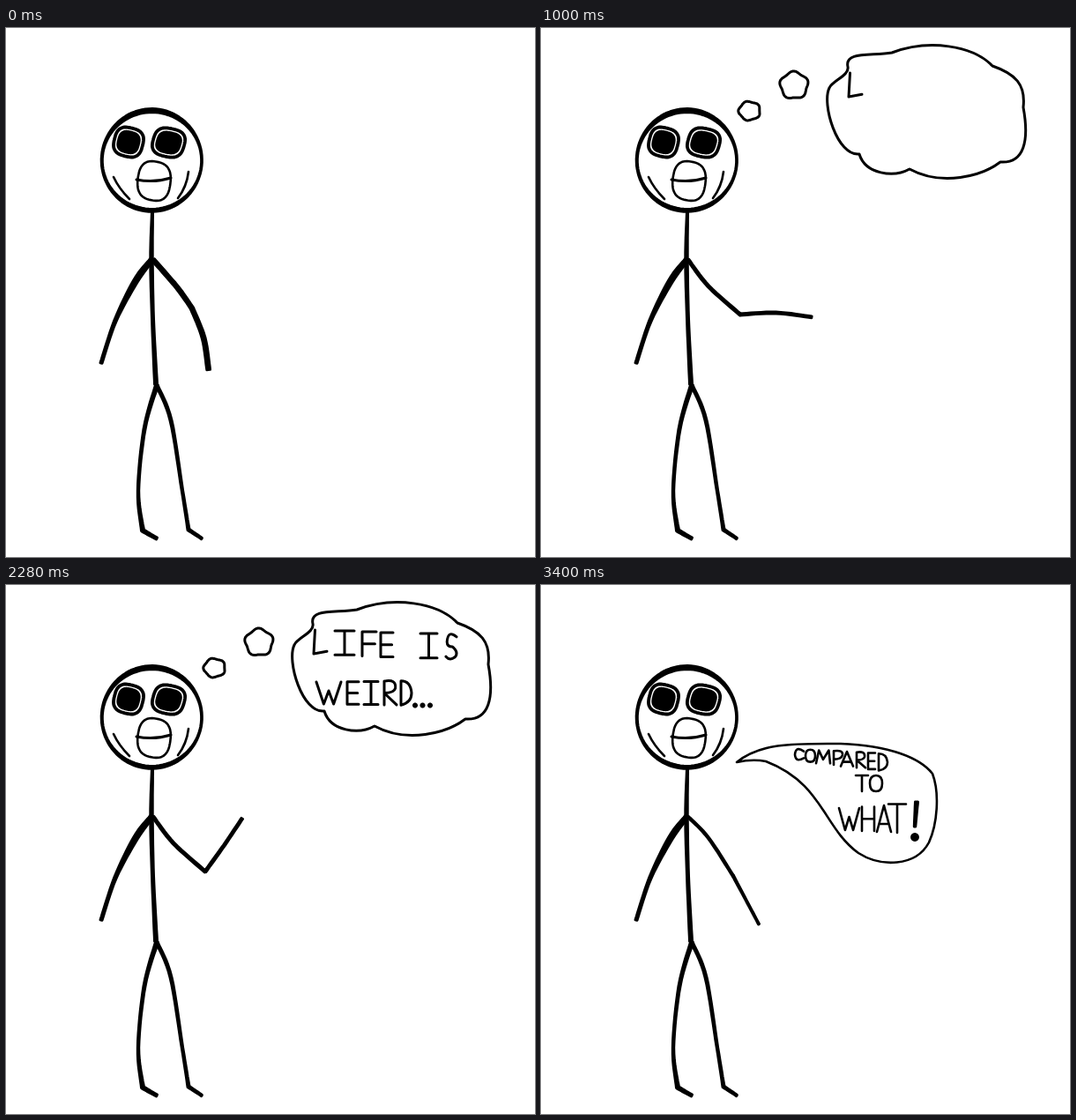
Recreate the animation shown at these times as an HTML page. Size 600 by 600 pixels, loop 3.84 s.

```html
<!DOCTYPE html>
<html lang="en">
<head>
<meta charset="utf-8">
<title>Life is weird</title>
<style>
html, body { margin: 0; width: 100%; height: 100%; overflow: hidden; background: #fff; }
svg { display: block; width: 100vw; height: 100vh; }
path { stroke: #000; stroke-width: 3; stroke-linecap: round; stroke-linejoin: round; fill-rule: evenodd; }
.pen { fill: none; }
.thin { fill: none; stroke-width: 2.6; }
.dot { stroke: none; }
</style>
</head>
<body>
<svg id="stage" viewBox="0 0 600 600" role="img" aria-label="Life is weird... Compared to what!"></svg>
<script>
const LOOP = 3840, STEP = 40, TAU = 2 * Math.PI;
const svg = document.getElementById('stage');

function add(cls, d = '') {
  const el = document.createElementNS('http://www.w3.org/2000/svg', 'path');
  el.setAttribute('class', cls);
  el.setAttribute('d', d);
  svg.appendChild(el);
  return el;
}

const mix = (p, q, u) => p.map((v, i) => v + (q[i] - v) * u);
const poly = pts => 'M' + pts.map(p => p[0].toFixed(1) + ' ' + p[1].toFixed(1)).join('L') + 'Z';
const around = (n, f) => Array.from({ length: n }, (_, i) => f(i / n * TAU));

// Catmull-Rom samples through [x, y, width] points
function smooth(pts) {
  const out = [], last = pts.length - 1;
  for (let i = 0; i < last; i++) {
    const a = pts[Math.max(0, i - 1)], b = pts[i], c = pts[i + 1], d = pts[Math.min(last, i + 2)];
    for (let u = 0; u < 1; u += 0.125) {
      out.push(b.map((v, j) => v + 0.5 * u * (c[j] - a[j] +
        u * (2 * a[j] - 5 * v + 4 * c[j] - d[j] + u * (3 * (v - c[j]) + d[j] - a[j])))));
    }
  }
  return [...out, pts[last]];
}

// Outline of a line of varying width; the 3 px round stroke finishes its ends
function brush(pts) {
  const c = smooth(pts), left = [], right = [];
  c.forEach((p, i) => {
    const a = c[Math.max(0, i - 1)], b = c[Math.min(c.length - 1, i + 1)];
    const dx = b[0] - a[0], dy = b[1] - a[1];
    const k = Math.max(0.2, (p[2] - 3) / 2) / (Math.hypot(dx, dy) || 1);
    left.push([p[0] - dy * k, p[1] + dx * k]);
    right.unshift([p[0] + dy * k, p[1] - dx * k]);
  });
  return poly(left.concat(right));
}
const limb = (...pts) => add('ink', brush(pts));

// Uneven ellipse with a number of soft lobes
const lump = (cx, cy, rx, ry, lobes, amp, turn = 0) => poly(around(72, a => {
  const r = 1 + amp * Math.cos(lobes * (a - turn));
  return [cx + rx * r * Math.cos(a), cy + ry * r * Math.sin(a)];
}));
const dot = (x, y, r) => lump(x, y, r, r, 0, 0);

// Head: a circle drawn thicker at top and bottom
const headEdge = side => poly(around(90, a => {
  const w = 5.2 - 1.3 * Math.cos(2 * a) - 0.6 * Math.sin(a + 0.3);
  const r = 56.6 + 2.2 * Math.cos(a - 0.9) + side * (w - 3) / 2;
  return [164 + r * Math.cos(a), 148.5 + r * Math.sin(a)];
}));
add('ink', headEdge(1) + headEdge(-1));

function eye(x, y, rx, ry) {
  add('pen', lump(x, y, rx, ry, 4, -0.05, 0.25)).style.strokeWidth = 3.8;
  add('dot', lump(x, y, rx - 3.4, ry - 3.4, 4, -0.05, 0.25));
}
eye(139, 129.5, 17.2, 17.2);
eye(184.5, 130, 18.8, 16.9);

add('thin', lump(168, 173.5, 19.3, 23, 4, -0.04, 0.15));
add('pen', 'M148 172Q168 176 187 170');
add('thin', 'M122 169Q128 182 140 194M207 163Q205 180 195 193');

// Body, left arm, legs
limb([166, 208, 4], [165, 262, 5.5], [166.5, 330, 5], [170, 404, 6]);
limb([165, 263, 7], [147, 287, 8], [124, 332, 5.5], [108, 380, 5]);
limb([171, 405, 6], [157, 455, 5], [150, 525, 4.5], [155, 570, 6]);
limb([155, 570, 6], [171, 579, 5]);
limb([171, 405, 5], [187, 445, 5], [200, 525, 4.5], [207, 569, 5]);
limb([207, 569, 5], [222, 579, 4.5]);

// Right arm pose: mid x, mid y, elbow x, elbow y, angle, length, bulge, upper width, fore width
const REST = [194, 294, 211, 318, 165, 72, -4, 6.5, 6.8];
const DOWN = [190, 287, 218, 330, 152, 62, 0, 4.4, 4];
const upper = add('ink'), fore = add('ink');

// u = 0: hand up by the face, u = 1: forearm level; the swing slows midway
function raised(u) {
  const ang = -10 + 102 * u * (2.08 + u * (3.4 * u - 4.48));
  return [190, 293, 226, 325, ang, 81 - 10 * Math.sin(Math.PI * u), 3 - ang * 0.07, 5, 4.8];
}

function armPose(t) {
  if (t < 160) return REST;
  if (t <= 600) return mix(REST, raised(1 / 7), (t - 120) / 480);
  if (t >= 2640) return DOWN;
  if (t > 2360) return mix(raised(1), DOWN, (t - 2360) / 280);
  const k = (t / STEP) % 17;
  return raised(Math.max(0, Math.min(k, 17 - k) - 1) / 7);
}

function drawArm([mx, my, ex, ey, ang, len, bulge, wu, wf]) {
  const a = ang * Math.PI / 180, s = Math.sin(a), c = Math.cos(a);
  const along = (u, side) => [ex + s * len * u + c * side, ey - c * len * u + s * side, wf];
  upper.setAttribute('d', brush([[167, 263, wu], [mx, my, wu], [ex, ey, wu]]));
  fore.setAttribute('d', brush([[ex, ey, wu], along(0.5, bulge), along(1, 0)]));
}

// Hand lettering on a 10 by 10 box
const GLYPH = {
  A: 'M0 10L5 0L10 10M2 7L8 7',
  C: 'M10 2Q1 -3 0 5Q1 12 10 8',
  D: 'M0 0L0 10Q10 9 10 5Q9 0 0 0',
  E: 'M10 0L0 0L0 10L10 10M0 5L9 5',
  F: 'M10 0L0 0L0 10M0 5L9 5',
  H: 'M0 0L0 10M10 0L10 10M0 5L10 5',
  I: 'M0 0L10 0M5 0L5 10M0 10L10 10',
  L: 'M1 0L0 10L10 9',
  M: 'M0 10L2 0L5 7L9 0L10 10',
  O: 'M5 0Q0 0 0 5Q0 10 5 10Q10 10 10 5Q10 0 5 0',
  P: 'M0 0L0 10M0 0Q10 -1 9 3Q8 6 0 6',
  R: 'M0 0L0 10M0 0Q10 -1 9 3Q8 5 0 5L10 10',
  S: 'M10 1Q2 -2 1 3Q1 5 6 5Q12 7 9 9Q4 11 0 9',
  T: 'M0 0L10 0M5 0L5 10',
  W: 'M0 0L3 10L5 4L7 10L10 0'
};

// Spans give each letter's left and right edge; dy and dh change per letter
function row(cls, text, spans, y, h, dy = 0, dh = 0) {
  return spans.split(' ').map((span, i) => {
    const [x0, x1] = span.split('-').map(Number);
    return add(cls, GLYPH[text[i]].replace(/(-?\d+) (-?\d+)/g, (_, gx, gy) =>
      `${x0 + (x1 - x0) * gx / 10} ${y + dy * i + (h + dh * i) * gy / 10}`));
  });
}

// Each item appears one gap after the one before
const shows = [];
function series(start, gap, end, items) {
  items.forEach((el, i) => shows.push([el, start + i * gap, end]));
}

series(720, 80, 2640, [
  add('pen', lump(236.5, 94, 12, 10.5, 5, 0.06, 0.6)),
  add('pen', lump(287, 65, 15.5, 15, 5, 0.07, 0.9)),
  add('pen', 'M348 44C344 26 375 32 398 28C440 12 490 20 512 43C538 52 550 64 547 90' +
    'C554 128 548 154 521 152C500 168 455 180 418 160C400 170 368 166 361 143' +
    'C336 146 318 86 327 68C330 60 350 54 348 44Z'),
  ...row('pen', 'LIFEIS', '349-364 373-395 404-420 425-439 470-489 499-511', 51, 27, 1, 0.2),
  ...row('pen', 'WEIRD', '352-380 387-400 406-422 429-443 448-460', 110, 25, -0.3, 0.6),
  ...[464, 472.5, 481].map(x => add('dot', dot(x, 136.5, 3)))
]);

series(2800, STEP, LOOP, [
  add('thin', 'M222 201C250 178 290 180 340 180C395 182 430 196 444 214C452 235 450 270 440 292' +
    'C425 320 385 320 360 304C320 275 320 225 255 200Q240 197 222 201Z'),
  ...row('thin', 'COMPARED', '288-298 300-311 312-328 332-343 340-354 358-368 371-379 383-393', 186, 13, 0.75, 0.9),
  ...row('thin', 'TO', '357-371 373-387', 216, 18),
  ...row('thin', 'WHAT', '338-361 364-378 381-397 394-414', 253, 25, -1.5, 2.5),
  add('ink', brush([[426, 246, 6], [424, 274, 4.5]]) + dot(424, 286, 3.4))
]);

function draw(ms) {
  const t = Math.floor(ms % LOOP / STEP) * STEP;
  drawArm(armPose(t));
  for (const [el, from, to] of shows) el.style.display = t >= from && t < to ? '' : 'none';
}

let start = null;
function tick(now) {
  if (start === null) start = now;
  draw(Math.max(0, now - start));
  requestAnimationFrame(tick);
}
draw(0);
requestAnimationFrame(tick);
</script>
</body>
</html>
```
